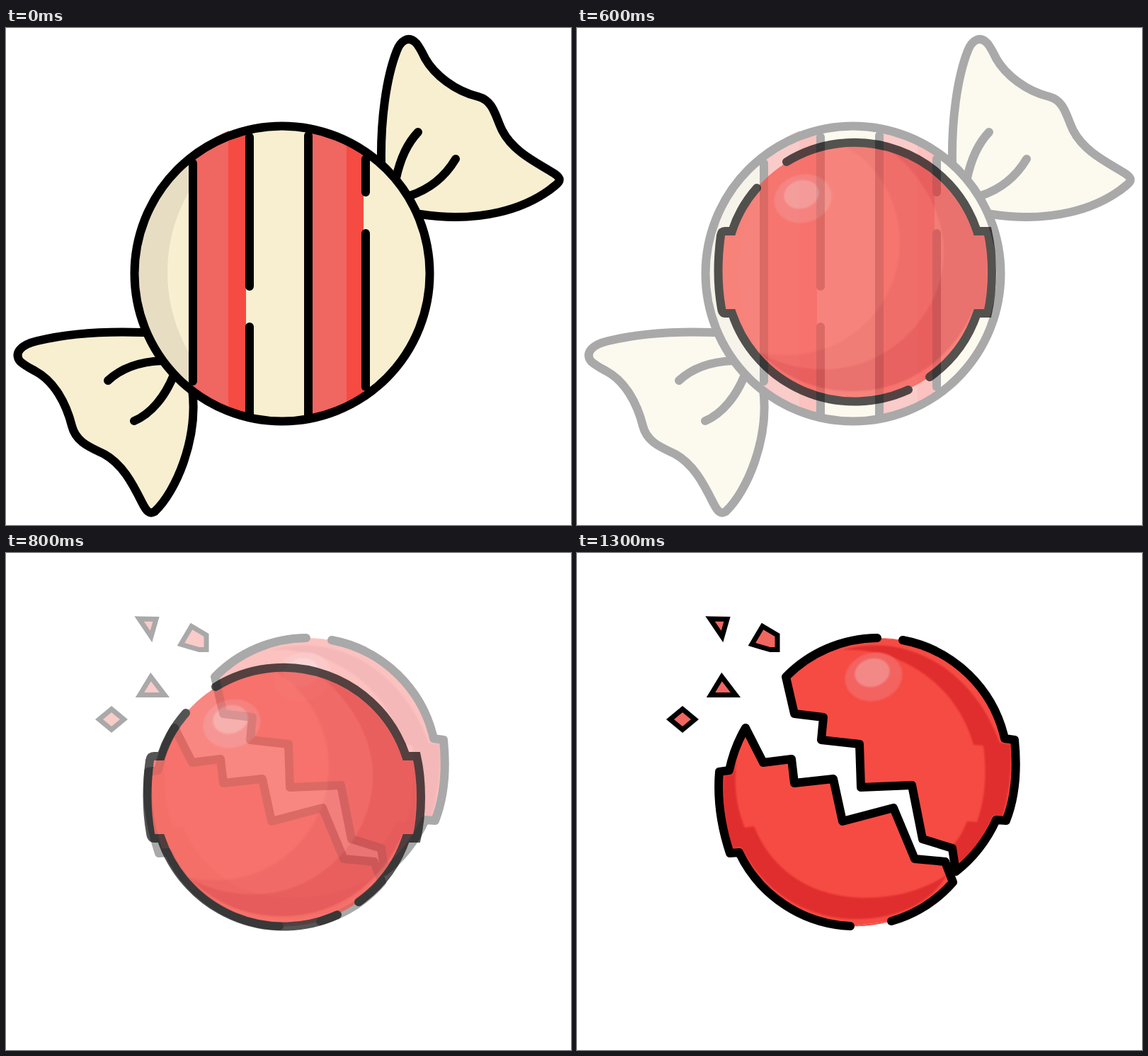
These frames come from a looping animation (798x702 px, 1.5 s). An HTML page:

```html
<!DOCTYPE html>
<html lang="en">
<head>
<meta charset="utf-8">
<title>Candy</title>
<style>
  html, body { margin: 0; width: 100%; height: 100%; overflow: hidden; background: #fff; }
  svg { display: block; width: 100%; height: 100%; }
  .line { fill: none; stroke: #000; stroke-width: 12; stroke-linecap: round; stroke-linejoin: round; }
  .miter { stroke-linejoin: miter; }
  .cream { fill: #f8efd1; }
  .red { fill: #f64b43; }
  .mid { fill: #ec403c; }
  .dark { fill: #e02e2e; }
  .pale { fill: #f06661; }
  .soft { filter: blur(.8px); }
  .shard { stroke: #000; stroke-width: 7; }
</style>
</head>
<body>
<svg viewBox="0 0 798 702">
  <defs>
    <clipPath id="disc"><circle cx="390" cy="347" r="209"/></clipPath>
    <g id="shine" class="soft">
      <ellipse rx="41" ry="34" transform="translate(319 241) rotate(-15)" fill="#f36360"/>
      <ellipse rx="25" ry="20" transform="translate(317 235) rotate(-15)" fill="#f28987"/>
    </g>
    <path id="upper" d="M424 120A182.5 182.5 0 0 0 295 175L307 227L348 232L345 264L399 270L401 331L473 328L488 404L530 417L535 450Q572 421 592 377L606 378C619 345 622 304 618 264L604 262A182.5 182.5 0 0 0 460 123"/>
    <path id="lower" d="M386 527A182.5 182.5 0 0 1 229 423L216 424C203 385 198 345 201 309L215 307Q222 274 238 247L263 296L303 291L307 325L362 319L375 379L447 360L477 432L520 436L531 465A182.5 182.5 0 0 1 444 520"/>
  </defs>

  <g id="wrapped">
    <g class="line">
      <path class="cream" d="M530 190C529 130 537 70 552 32C557 19 568 9 580 22C586 30 589 37 592 43C605 66 634 89 667 97C689 103 691 125 701 145C717 176 752 191 775 206C784 212 784 216 775 223C735 256 668 276 585 263"/>
      <path class="cream" d="M194 430C140 428 85 432 44 442C22 447 10 459 20 471C28 478 35 481 42 485C68 499 85 530 93 562C99 586 121 593 139 602C164 616 178 642 192 670C199 684 203 687 210 683C240 655 272 580 263 510"/>
      <path d="M582 147Q560 170 551 212M635 185C623 205 604 226 570 237M220 470Q172 472 144 498M237 490C225 520 205 545 181 555"/>
    </g>
    <path class="pale" d="M264 190Q280 158 315 145V200H264Z"/>
    <g clip-path="url(#disc)">
      <circle cx="390" cy="347" r="209" fill="#e6ddc3"/>
      <circle cx="456" cy="345" r="228" class="cream"/>
      <path class="pale" d="M264 130H314V570H264ZM427 130H481V570H427Z"/>
      <path class="red" d="M314 130H339V570H314ZM481 130H505V570H481Z"/>
    </g>
    <g class="line">
      <path d="M264 191V499M344 154V365M344 422V545M427 152V547M508 185V232M508 290V507"/>
      <circle cx="390" cy="347" r="208.5"/>
    </g>
  </g>

  <g id="broken">
    <use href="#upper" class="red"/>
    <use href="#lower" class="red"/>
    <path class="red" d="M386 527A182.5 182.5 0 0 0 444 520ZM424 120A182.5 182.5 0 0 1 460 123Z"/>
    <g class="dark soft">
      <path d="M375 137C465 110 560 165 597 268L612 270Q616 320 601 372L588 371C575 400 560 425 537 442L528 416C538 406 545 394 551 379L565 380C577 345 579 310 574 272L560 271C535 180 450 132 375 137Z"/>
      <path d="M226 290C220 330 226 360 237 388L250 386C280 460 345 487 408 487C455 487 490 475 522 455C500 495 450 517 395 517C320 517 262 475 232 416L219 417C206 380 204 340 208 314L220 312Z"/>
    </g>
    <use href="#shine" x="100" y="-66"/>
    <use href="#upper" class="line"/>
    <use href="#lower" class="line"/>
    <path class="pale shard" d="M188 93L212 93.5L205 118ZM262 103.5L283 116V136.5H273L247 129ZM204.5 175L224 200.5H189ZM149 220.5L166.5 235L149 249.5L131.5 235Z"/>
  </g>

  <g id="ball">
    <g class="red">
      <circle cx="392" cy="344.7" r="182"/>
      <path d="M208 287H580Q588 345 580 403H208Q194 345 208 287Z"/>
    </g>
    <g class="soft">
      <path class="dark" d="M440 172C500 192 540 235 562 291H576Q583 345 576 397H560C532 465 468 513 390 513C335 513 290 492 258 458C285 475 320 482 350 482C440 482 518 405 518 315C518 260 485 205 440 172Z"/>
      <path class="mid" d="M375 166Q410 164 442 174C485 205 518 260 518 315C518 405 440 482 350 482C320 482 285 475 258 458Q275 462 297 462C385 462 456 390 456 303C456 245 425 190 375 166Z"/>
    </g>
    <use href="#shine"/>
    <g class="line miter">
      <path d="M254 226Q230 253 219 287H209Q204 287 203 293C198 330 198 362 204 396Q205 403 209 403H219A182.5 182.5 0 0 0 468 511"/>
      <path d="M296 189A182.5 182.5 0 0 1 565 287H580C588 322 588 368 580 403H565A182.5 182.5 0 0 1 498 493"/>
    </g>
  </g>
</svg>
<script>
  const LOOP = 1500, HOLD = 500, STEP = 100;
  const [wrapped, ball, broken] = ['wrapped', 'ball', 'broken'].map(id => document.getElementById(id));

  function show(layer, opacity) {
    layer.style.opacity = opacity;
  }

  // Two stepped cross-fades, three steps each: wrapped -> ball -> broken.
  function draw(now) {
    const t = now % LOOP;
    const step = t < HOLD ? 0 : Math.min(6, Math.floor((t - HOLD) / STEP) + 1);
    const before = Math.max(0, 1 - step / 3);
    const after = Math.max(0, step / 3 - 1);
    show(wrapped, before);
    show(broken, after);
    show(ball, 1 - before - after);
    requestAnimationFrame(draw);
  }
  draw(0);
</script>
</body>
</html>
```
